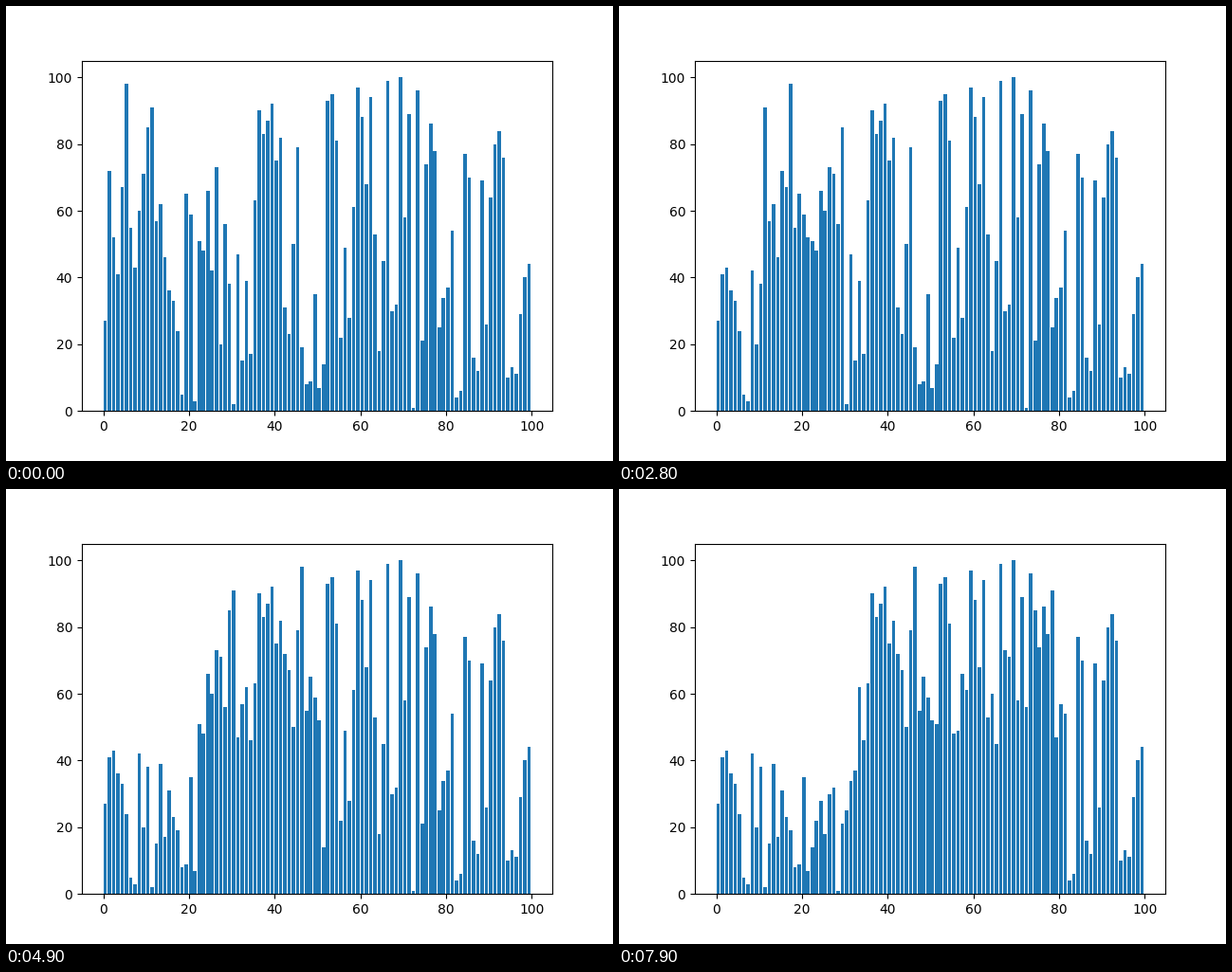
A matplotlib script that plays this animation: 640 by 480 pixels, repeating every 8000 ms.

```python
import matplotlib.pyplot as plt
from matplotlib.animation import FuncAnimation

FRAMES = 80
INTERVAL = 100

VALUES = [
    27, 72, 52, 41, 67, 98, 55, 43, 60, 71,
    85, 91, 57, 62, 46, 36, 33, 24, 5, 65,
    59, 3, 51, 48, 66, 42, 73, 20, 56, 38,
    2, 47, 15, 39, 17, 63, 90, 83, 87, 92,
    75, 82, 31, 23, 50, 79, 19, 8, 9, 35,
    7, 14, 93, 95, 81, 22, 49, 28, 61, 97,
    88, 68, 94, 53, 18, 45, 99, 30, 32, 100,
    58, 89, 1, 96, 21, 74, 86, 78, 25, 34,
    37, 54, 4, 6, 77, 70, 16, 12, 69, 26,
    64, 80, 84, 76, 10, 13, 11, 29, 40, 44,
]


def partition_steps(values):
    """Yield the list after each comparison with the last element as pivot."""
    a = list(values)
    pivot = a[-1]
    store = 0
    for j in range(len(a) - 1):
        if a[j] <= pivot:
            a[store], a[j] = a[j], a[store]
            store += 1
        yield list(a)


# The first comparison is already done when the loop begins.
states = list(partition_steps(VALUES))[1:FRAMES + 1]

fig, ax = plt.subplots(figsize=(6.4, 4.8), dpi=100)
bars = ax.bar(range(len(VALUES)), VALUES, align="edge")


def update(frame):
    for bar, height in zip(bars, states[frame]):
        bar.set_height(height)
    return bars


anim = FuncAnimation(fig, update, frames=FRAMES, interval=INTERVAL,
                     repeat=True, repeat_delay=0)
plt.show()
```
